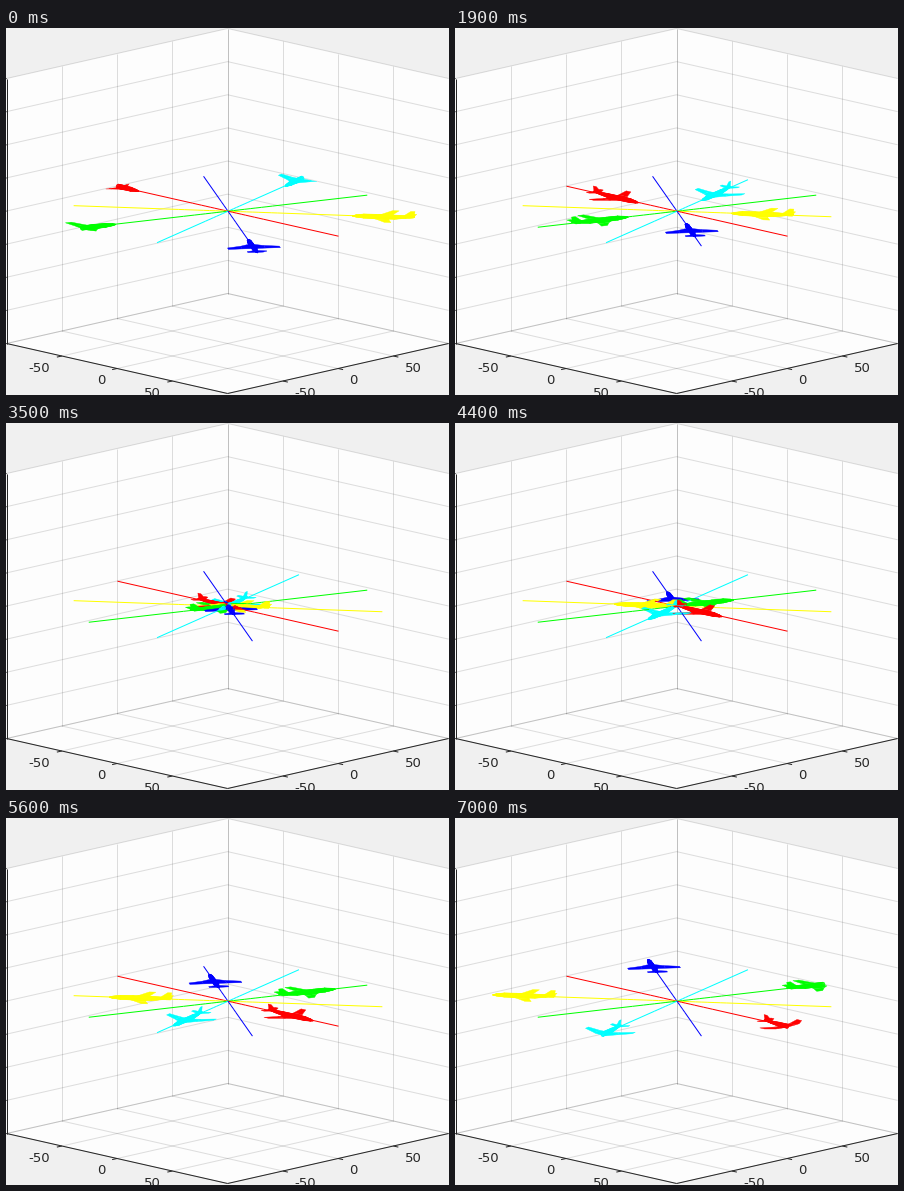
Animation of 443 by 367 pixels, one loop 7.1 s. Source, as a matplotlib script:

```python
import numpy as np
import matplotlib.pyplot as plt
from matplotlib.animation import FuncAnimation
from matplotlib.collections import LineCollection, PolyCollection

W, H, DPI = 443, 367, 100
PX = 72 / DPI                      # one pixel in points
LIM = 100                          # half size of the plotted cube
HOLD, STEPS = 4, 66
INK = "#262626"
COLORS = ["#ff0000", "#00ff00", "#0000ff", "#ffff00", "#00ffff"]
HEADINGS = np.radians(72 * np.arange(5))


def project(p, z_scale=1.5):
    """Orthographic view along the cube's diagonal, in stage pixels."""
    x, y, z = np.asarray(p, float).T
    return np.column_stack([222.0 + 1.105 * (x + y),
                            183.2 + 0.25 * (x - y) - z_scale * z])


def depth(p):
    x, y, z = np.mean(p, axis=0)
    return 0.69 * (x - y) + 0.225 * z


def clip(poly):
    """Cut a polygon to the cube's x and y limits."""
    for axis in (0, 1):
        for sign in (1, -1):
            d = LIM - sign * poly[:, axis]
            if (d >= 0).all():
                continue
            out = []
            for i in range(len(poly)):
                a, b, da, db = poly[i - 1], poly[i], d[i - 1], d[i]
                if (da >= 0) != (db >= 0):
                    out.append(a + (b - a) * da / (da - db))
                if db >= 0:
                    out.append(b)
            if len(out) < 3:
                return None
            poly = np.array(out)
    return poly


def tube(stations, n=10):
    """Facets around a body given as (forward, radius, height) stations."""
    ang = np.linspace(0, 2 * np.pi, n + 1)
    rings = [np.column_stack([np.full(n + 1, f), r * np.cos(ang), z + r * np.sin(ang)])
             for f, r, z in stations]
    return [np.array([a[i], a[i + 1], b[i + 1], b[i]])
            for a, b in zip(rings, rings[1:]) for i in range(n)]


def airliner():
    """Facets in (forward, right, up) coordinates."""
    parts = tube([(19.4, 0.2, -0.2), (17, 0.8, -0.1), (12, 1.4, 0), (4, 1.5, 0),
                  (-8, 1.4, 0), (-15, 0.9, 0.3), (-21, 0.3, 0.6)])
    for s in (1, -1):
        parts.append(np.array([(8, s, -0.6), (2, s * 7.5, -0.3),
                               (-5.5, s * 7.5, -0.3), (-4.5, s, -0.6)]))
        parts.append(np.array([(2, s * 7.5, -0.3), (-4, s * 16.8, 0.3),
                               (-8.2, s * 16.8, 0.3), (-5.5, s * 7.5, -0.3)]))
        parts.append(np.array([(-15, s * 0.4, 0.6), (-18.5, s * 6.3, 0.9),
                               (-21.3, s * 6.3, 0.9), (-20.5, s * 0.4, 0.6)]))
    parts.append(np.array([(-13.5, 0, 0.8), (-18.5, 0, 4.2), (-21.2, 0, 4.2), (-20.5, 0, 0.6)]))
    return parts


def place(part, heading, dist):
    c, s = np.cos(heading), np.sin(heading)
    f, r, u = part.T
    f = f + dist
    return np.column_stack([f * c + r * s, f * s - r * c, u])


fig = plt.figure(figsize=(W / DPI, H / DPI), dpi=DPI, facecolor="#f0f0f0")
ax = fig.add_axes([0, 0, 1, 1])
ax.set_xlim(0, W)
ax.set_ylim(H, 0)
ax.axis("off")

# Cube outline and grid; vertical lines snap to whole pixels
LEFT, MID, RIGHT = 0.6, 221.6, 442.6
ax.fill([LEFT, MID, W, W, MID, LEFT],
        [50.5, 0.5, 50.5, 315.5, 365.5, 315.5], color="#fdfdfd", lw=0)


def along(a, b, t):
    return tuple(np.array(a) + (np.array(b) - np.array(a)) * t)


left, back, right, front = (LEFT, 315.5), (MID, 265.5), (RIGHT, 315.5), (MID, 365.5)
grid = []
for t in np.linspace(0, 1, 5):
    for a, b in ((left, back), (back, right)):
        x, y = along(a, b, t)
        grid.append([(x, y), (x, y - 265)])
    grid.append([along(left, front, t), along(back, right, t)])
    grid.append([along(left, back, t), along(front, right, t)])
for k in range(9):
    up = 265 * k / 8
    for a, b in ((left, back), (back, right)):
        grid.append([(a[0], a[1] - up), (b[0], b[1] - up)])
ax.add_collection(LineCollection(grid, colors=[(0.15, 0.15, 0.15, 0.15)],
                                 linewidths=PX, zorder=1))

# Axes, ticks and labels
axes = [[(LEFT, 50.5), left], [left, front], [front, right]]
for k in range(9):
    y = 50.5 + 265 * k / 8
    axes.append([(LEFT, y), (LEFT - 5, y + 1.1)])
for t, label in ((0.25, "-50"), (0.5, "0"), (0.75, "50")):
    for a, b, s, ha in ((left, front, -1, "right"), (front, right, 1, "left")):
        x, y = along(a, b, t)
        axes.append([(x, y), (x + 5 * s, y + 1.1)])
        ax.text(x + 11.5 * s, y + 16, label, ha=ha, va="baseline", color=INK,
                family="DejaVu Sans", size=13.3 * PX)
ax.add_collection(LineCollection(axes, colors=INK, linewidths=PX, zorder=2))

# Flight paths, cut finely near the crossing so they sort with the planes
cuts = np.concatenate([[-LIM], np.linspace(-32, 32, 17), [LIM]])
paths = []
for h, color in zip(HEADINGS, COLORS):
    for a, b in zip(cuts, cuts[1:]):
        seg = place(np.array([(a, 0, 0), (b, 0, 0)]), h, 0)
        paths.append((depth(seg), project(seg), color, PX))

PLANE = airliner()
scene = PolyCollection([], zorder=3, closed=False)
ax.add_collection(scene)


def draw(n):
    dist = LIM * (2 * max(0, n - HOLD) / STEPS - 1)
    items = list(paths)
    for h, color in zip(HEADINGS, COLORS):
        for part in PLANE:
            poly = clip(place(part, h, dist))
            if poly is not None:
                items.append((depth(poly), project(poly), color, 0.4 * PX))
    items.sort(key=lambda item: item[0])
    _, verts, colors, widths = zip(*items)
    scene.set_verts(verts, closed=False)
    scene.set_color(colors)
    scene.set_linewidth(widths)
    return scene,


anim = FuncAnimation(fig, draw, frames=HOLD + STEPS + 1, interval=100,
                     repeat=True, repeat_delay=0)
plt.show()
```
